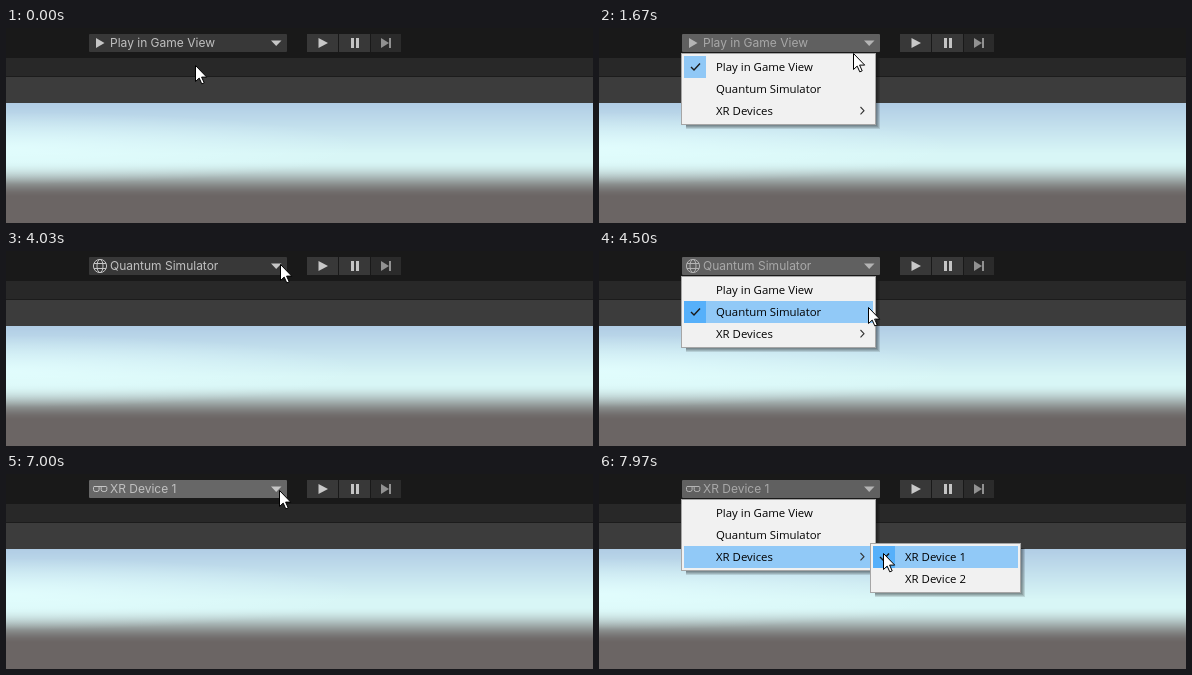
An HTML page with a canvas that plays this animation: 587 by 195 pixels, repeating every 8000 ms.

```html
<!DOCTYPE html>
<html lang="en">
<head>
<meta charset="utf-8">
<title>Play mode dropdown</title>
<style>
html, body { margin: 0; width: 100%; height: 100%; overflow: hidden; background: #191919; }
canvas { display: block; }
</style>
</head>
<body>
<canvas id="stage" width="587" height="195"></canvas>
<script>
const LOOP = 8000;
const STEP = 1000 / 15;
const LINGER = 270;
const ROW = 22;
const ctx = document.getElementById('stage').getContext('2d');
const MODES = ['Play in Game View', 'Quantum Simulator', 'XR Device 1'];
const MENU = { x: 82, y: 25, w: 195, h: 72, items: ['Play in Game View', 'Quantum Simulator', 'XR Devices'] };
const SUB = { x: 271, y: 69, w: 151, h: 50, items: ['XR Device 1', 'XR Device 2'] };

// Each visit to the dropdown: when it is hovered, opened and closed, and the row picked
const VISITS = [
  { hover: 720, open: 1160, close: 2525, menu: MENU, row: 1 },
  { hover: 4025, open: 4095, sub: 4975, close: 5845, menu: SUB, row: 0 },
  { hover: 6655, open: 7070, sub: 7690, close: Infinity }
];

// Pointer moves: start, end, x, y
const HOME = { x: 190, y: 38 };
const MOVES = [
  [500, 1080, 259, 12], [1620, 1930, 245, 64], [3040, 3490, 281, 14],
  [3650, 3830, 275, 14], [4240, 4780, 267, 79], [4980, 5520, 298, 83],
  [6050, 7000, 274, 17], [7130, 7500, 272, 76], [7500, 7930, 285, 80]
];

const clamp = v => Math.max(0, Math.min(1, v));
const lerp = (a, b, k) => a + (b - a) * k;
const easeOut = k => 1 - (1 - k) ** 2;
const smooth = (a, b, v) => { const k = clamp((v - a) / (b - a)); return k * k * (3 - 2 * k); };
const mix = (a, b, k) => a.map((v, i) => lerp(v, b[i], k));

function pointerAt(t) {
  let { x, y } = HOME;
  for (const [start, end, toX, toY] of MOVES) {
    const k = easeOut(clamp((t - start) / (end - start)));
    x = lerp(x, toX, k);
    y = lerp(y, toY, k);
  }
  return { x: Math.round(x), y: Math.round(y) };
}

function box(x, y, w, h, color) {
  ctx.fillStyle = color;
  ctx.fillRect(x, y, w, h);
}

function poly(points, color) {
  ctx.beginPath();
  points.forEach(([x, y]) => ctx.lineTo(x, y));
  ctx.closePath();
  ctx.fillStyle = color;
  ctx.fill();
}

function line(points, color, width) {
  ctx.beginPath();
  points.forEach(([x, y]) => ctx.lineTo(x, y));
  ctx.strokeStyle = color;
  ctx.lineWidth = width;
  ctx.stroke();
}

function text(str, x, y, font, color) {
  ctx.font = font;
  ctx.fillStyle = color;
  ctx.fillText(str, x, y);
}

function drawScene() {
  box(0, 0, 587, 30, '#191919');
  box(0, 30, 587, 18, '#282828');
  box(0, 48, 587, 1, '#1c1c1c');
  box(0, 49, 587, 26, '#3c3c3c');

  const top = [177, 205, 229], bright = [216, 246, 246], ground = [107, 101, 100];
  for (let y = 75; y < 195; y++) {
    const sky = mix(top, bright, clamp((y - 75) / 50));
    box(0, y, 587, 1, `rgb(${mix(sky, ground, smooth(132, 169, y))})`);
  }

  // Brighter haze on the left
  ctx.save();
  ctx.beginPath();
  ctx.rect(0, 75, 587, 120);
  ctx.clip();
  ctx.translate(0, 120);
  ctx.scale(1, .1);
  const haze = ctx.createRadialGradient(0, 0, 0, 0, 0, 360);
  haze.addColorStop(0, 'rgba(228,255,255,.8)');
  haze.addColorStop(1, 'rgba(228,255,255,0)');
  box(0, -360, 360, 720, haze);
  ctx.restore();
}

function drawIcon(mode, color) {
  if (mode === 0) {
    poly([[90, 10], [98.5, 15], [90, 20]], color);
    return;
  }
  ctx.strokeStyle = color;
  ctx.lineWidth = 1;
  ctx.beginPath();
  if (mode === 1) {
    for (const rx of [6.6, 3]) {
      ctx.moveTo(94 + rx, 15);
      ctx.ellipse(94, 15, rx, 6.6, 0, 0, Math.PI * 2);
    }
    for (const y of [12.5, 17.5]) {
      ctx.moveTo(88, y);
      ctx.lineTo(100, y);
    }
  } else {
    for (const x of [87.5, 95.2]) ctx.roundRect(x, 12.5, 5.6, 5, [1, 1, 2, 2]);
    ctx.moveTo(88, 12.5);
    ctx.lineTo(100, 12.5);
  }
  ctx.stroke();
}

function drawToolbar(mode, hover, open) {
  const face = open ? '#606060' : hover ? '#676767' : '#383838';
  const ink = open ? '#b4b4b4' : '#c6c6c6';
  ctx.beginPath();
  ctx.roundRect(83, 6, 198, 18, 1);
  ctx.fillStyle = face;
  ctx.fill();
  drawIcon(mode, ink);
  text(MODES[mode], 104, 19, '12px Inter, sans-serif', open ? '#a8a8a8' : '#c0c0c0');
  poly([[265, 12.5], [275.5, 12.5], [270.2, 18]], ink);

  for (const x of [301, 333]) box(x, 6, 31, 18, '#383838');
  box(365, 6, 30, 18, '#2b2b2b');
  poly([[312.5, 10], [322, 15], [312.5, 20]], '#c8c8c8');
  for (const x of [345, 350]) box(x, 10, 3, 10, '#c4c4c4');
  poly([[375, 10], [383, 15], [375, 20]], '#919191');
  box(383, 10, 2, 10, '#919191');
}

function drawRow(menu, i, hot, checked) {
  const x = menu.x + 3, y = menu.y + 3 + i * ROW;
  const label = menu.items[i];
  if (hot) box(x, y, menu.w - 6, ROW, '#91c9f7');
  if (checked) {
    box(x, y, ROW, ROW, hot ? '#56b0fa' : '#90c8f6');
    line([[x + 7, y + 11], [x + 10, y + 14], [x + 16, y + 7.5]], '#1a1a1a', 1.4);
  }
  text(label, menu.x + 35, y + 15, '11.4px "Open Sans", sans-serif', '#000');
  if (label === 'XR Devices') line([[261.5, y + 7], [265, y + 10.7], [261.5, y + 14.4]], '#333', 1.1);
}

function drawMenu(menu, age, pointer, mode) {
  if (!(age >= 0)) return;
  const { x, y, w, h, items } = menu;
  const inside = pointer.x > x + 2;
  const hot = inside ? Math.floor((pointer.y - y - 3) / ROW) : -1;
  ctx.globalAlpha = clamp((age + 50) / 230);
  for (let i = 4; i > 0; i--) box(x + 5, y + 5, w - 5 + i, h - 5 + i, 'rgba(0,0,0,.12)');
  box(x, y, w, h, '#a6a6a6');
  box(x + 1, y + 1, w - 2, h - 2, '#f1f1f1');
  items.forEach((label, i) => drawRow(menu, i, i === hot, label === MODES[mode]));
  ctx.globalAlpha = 1;
}

// The chosen row lingers briefly after its menu closes
function drawChosen({ close, menu, row }, t) {
  const age = t - close;
  if (age < 0 || age >= LINGER) return;
  ctx.globalAlpha = 1 - age / LINGER;
  drawRow(menu, row, true, false);
  ctx.globalAlpha = 1;
}

function drawPointer({ x, y }) {
  ctx.save();
  ctx.translate(x - .5, y - .5);
  poly([[0, 0], [0, 16], [3.7, 12.6], [6.3, 18.4], [8.7, 17.3], [6.1, 11.6], [11.2, 11.6]], '#fff');
  ctx.strokeStyle = '#000';
  ctx.lineWidth = 1;
  ctx.stroke();
  ctx.restore();
}

function draw(t) {
  const pointer = pointerAt(t);
  const mode = VISITS.filter(v => t >= v.close + STEP).length;
  const visit = VISITS.find(v => t >= v.hover && t < v.close);
  drawScene();
  drawToolbar(mode, !!visit, !!visit && t >= visit.open);
  if (visit) {
    drawMenu(MENU, t - visit.open, pointer, mode);
    drawMenu(SUB, t - visit.sub, pointer, mode);
  }
  VISITS.forEach(v => drawChosen(v, t));
  drawPointer(pointer);
}

const begin = performance.now();
function tick() {
  const t = (performance.now() - begin) % LOOP;
  draw(Math.floor((t + 15) / STEP) * STEP);
  requestAnimationFrame(tick);
}
tick();
</script>
</body>
</html>
```
